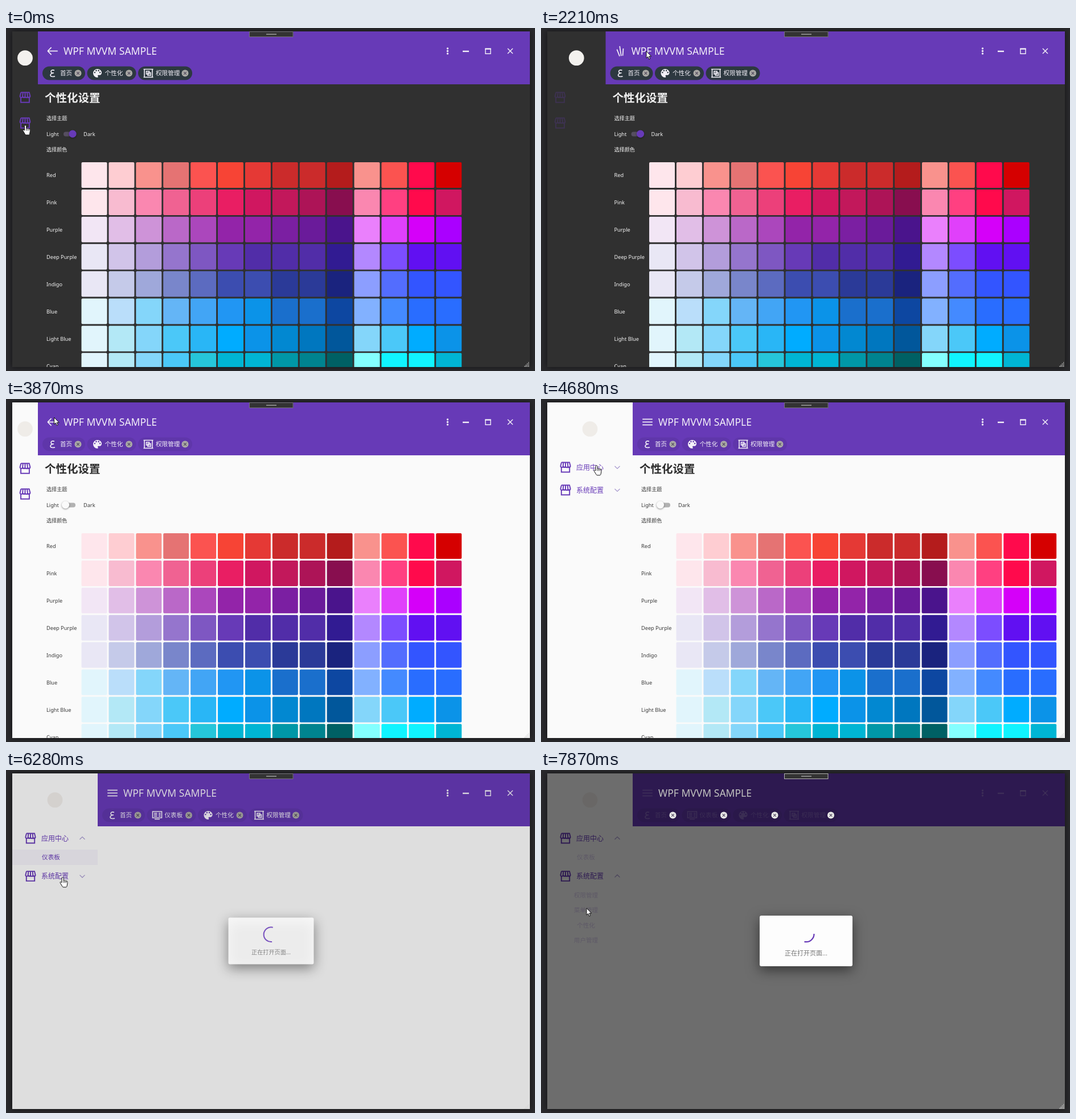
An HTML page with a canvas that plays this animation: 929x603 px, repeating every 8 s.

```html
<!DOCTYPE html>
<html lang="zh-CN">
<head>
<meta charset="utf-8">
<style>
html, body { margin: 0; height: 100%; overflow: hidden; background: #29292c }
canvas { display: block }
</style>
</head>
<body>
<canvas id="stage" width="929" height="603"></canvas>
<script>
const ctx = document.getElementById('stage').getContext('2d');
const LOOP = 8000, STEP = 120;
const PURPLE = '#673ab7';

// The screen refreshes every STEP ms, counted from each of these times.
const BURSTS = [0, 270, 1150, 1790, 1940, 2210, 3080, 3470, 3750, 4140, 4290, 4560,
  4960, 5340, 5610, 6130, 6280, 6650, 6800, 7560, 7720, 7870];

// Pointer track: time, x, y
const POINTER = [
  [0, 34, 171], [120, 199, 133], [270, 170, 165], [390, 140, 173], [510, 115, 130],
  [630, 95, 80], [750, 84, 48], [870, 80, 40], [1270, 81, 40], [1630, 172, 147],
  [1790, 179, 43], [1940, 185, 41], [2210, 185, 41], [2450, 142, 131], [2690, 107, 184],
  [3320, 107, 184], [3470, 99, 110], [3600, 94, 49], [3870, 84.5, 32.5], [4290, 84.5, 32.5],
  [4410, 97, 62], [4680, 97.5, 117], [5200, 97.5, 117], [5460, 88, 152], [6130, 88, 152],
  [6280, 99.5, 189], [6800, 99.5, 189], [7280, 80, 243], [8000, 80, 243]];

const PALETTE = {
  'Red': 'fee6ec fecdd2 f9928d e57373 fb5350 f74435 e53935 cb2b2b cb2b2b b41c1c f9928d fb5350 ff0a4c d50000',
  'Pink': 'fee6ec f8bbd0 fa87b0 f06292 ec407a e91e63 d01760 c2185b ad1457 880e4f fa87b0 ff4081 ff0a4c d01760',
  'Purple': 'f2e6f5 e1bee7 ce93d8 ba68c8 ab47bc 9324a9 9324a9 7b1fa2 6a1b9a 4a148c ea80fc e040fb d500f9 aa00ff',
  'Deep Purple': 'e9e7f5 d1c4e9 b39ddb 9575cd 7e57c2 673ab7 512da8 512da8 512da8 311b92 b388ff 7c4dff 6110f2 6110f2',
  'Indigo': 'e9e7f5 c5cae9 9fa8da 7986cb 5c6bc0 3c4db0 3c4db0 2b3a98 2b3a98 1a237e 8c9eff 536dfe 3355ff 3355ff',
  'Blue': 'e1f5fc badefa 84d6fa 64b5f6 42a5f5 2196f3 0b93e8 1a6fcc 1a6fcc 0d47a1 82b1ff 448aff 296dff 296dff',
  'Light Blue': 'e1f5fc b3e8f6 84d6fa 4bc8f8 29b6f6 00acff 0b93e8 0288d1 0077bf 01579b 84d6fa 4bc8f8 00acff 0b93e8',
  'Cyan': 'e1f5fc b3e8f6 84d6fa 4bc8f8 26c6da 00b5d4 00b5d4 0097a7 00838f 006064 84ffff 10f4ff 10f4ff 00b5d4'
};
const ROWS = Object.entries(PALETTE).map(([name, list]) => [name, list.split(' ')]);

const hole = (x, y) => `M${x} ${y - 1.5}a1.5 1.5 0 1 0 .01 0z`;
const ICON = {
  home: new Path2D('M3-5c-4-1.5-6 0-6 2.2s3 2.8 5 2.3c-4 .5-6 1.5-6 4s4 3 8 2'),
  board: new Path2D('M-8-6.5H8V4.5H-8ZM-4.5 7H4.5M-5.5-3.5H0M-5.5-1H0M-5.5 1.8H0M2.5-3.5H6M2.5-1H6M2.5 1.8H6'),
  group: new Path2D('M-7-7H7V7H-7ZM-3.5-3.5H1.5V1.5H-3.5ZM-1-1H4V4H-1ZM-8.5-7H-5.5M5.5-7H8.5M-8.5 7H-5.5M5.5 7H8.5'),
  palette: new Path2D('M12 3a9 9 0 0 0 0 18 1.5 1.5 0 0 0 1.5-1.5c0-.4-.15-.75-.4-1a1.5 1.5 0 0 1 1.1-2.5H16a5 5 0 0 0 5-5c0-4.4-4-8-9-8Z'
    + hole(6.5, 10.5) + hole(9.5, 6.5) + hole(14.5, 6.5) + hole(17.5, 10.5)),
  store: new Path2D('M-7-8.5H7L8.6-2.2C8.6 1-4.3 1-4.3-2 -4.3 1 0 1 0-2 0 1 4.3 1 4.3-2 4.3 1 8.6 1 8.6-2.2M-7-8.5-8.6-2.2C-8.6 1-4.3 1-4.3-2L-3.6-8M0-8V-2M3.6-8 4.3-2M-7.2.5V8.5H7.2V.5'),
  chevron: new Path2D('M-4.5-2 0 2.4 4.5-2'),
  arrow: new Path2D('M0 0V12l2.8-2.6L4.8 14l2-.9-2-4.3H8.7Z'),
  hand: new Path2D('M0 0c-1.5 0-1.5 1-1.5 1.5V9l-1.5-1c-1.5-.5-2 .7-1.2 1.6l3.7 6.2c.4.7.8 1.2 1.8 1.2h4.2c1.2 0 1.8-.7 2-1.8l.8-4.2c.3-1.8.2-4-.5-4.6-.6-.5-1.2-.3-1.5 0-.5-.9-1.8-1-2.3-.4-.4-.7-1.7-.8-2.3-.3V1.5C1.5.5 1 0 0 0Z')
};

const clamp = v => Math.min(1, Math.max(0, v));
const mix = (a, b, k) => a + (b - a) * k;
const ramp = (t, start, span) => clamp((t - start) / span);
const easeOut = k => 1 - (1 - k) ** 3;

function rect(x, y, w, h, color, r = 0) {
  ctx.fillStyle = color;
  ctx.beginPath();
  ctx.roundRect(x, y, w, h, r);
  ctx.fill();
}
function disc(x, y, r, color) {
  ctx.fillStyle = color;
  ctx.beginPath();
  ctx.arc(x, y, r, 0, 7);
  ctx.fill();
}
function line(color, width, ...pts) {
  ctx.strokeStyle = color;
  ctx.lineWidth = width;
  ctx.beginPath();
  for (let i = 0; i < pts.length; i += 2) ctx.lineTo(pts[i], pts[i + 1]);
  ctx.stroke();
}
function text(s, x, cy, size, color, weight = 400, align = 'left') {
  ctx.font = `${weight} ${size}px "Noto Sans", "Noto Sans CJK SC", "Noto Sans CJK", sans-serif`;
  ctx.textAlign = align;
  ctx.fillStyle = color;
  ctx.fillText(s, x, cy + size * .37);
}
function at(x, y, paint, { scale = 1, turn = 0, alpha = 1 } = {}) {
  ctx.save();
  ctx.translate(x, y);
  ctx.rotate(turn);
  ctx.scale(scale, scale);
  ctx.globalAlpha *= alpha;
  paint();
  ctx.restore();
}
function outline(path, color, width) {
  ctx.strokeStyle = color;
  ctx.lineWidth = width;
  ctx.stroke(path);
}

function snap(t) {
  const start = BURSTS.findLast(b => b <= t);
  return start + Math.floor((t - start) / STEP) * STEP;
}

function stateAt(t) {
  const slide = start => easeOut(ramp(t, start, 330));
  const open = slide(1050) - slide(2150) + slide(4102);
  const opened = t >= 4102 ? 4102 : t >= 2150 ? 2150 : t >= 1050 ? 1050 : -LOOP;
  return {
    t, open, edge: 56 + 105 * open,
    expanded: opened === 1050 || opened === 4102,
    menuIn: ramp(t, opened, 450),
    light: t >= 3080,
    thumb: ramp(t, 3020, 200),
    apps: ramp(t, 4900, 300),
    system: ramp(t, 6550, 300),
    board: t >= 5850,
    busy: t >= 5610 && t < 6130 || t >= 7560,
    enter: t < 7000 ? ramp(t, 5620, 300) : ramp(t, 7570, 300),
    leave: t < 7000 ? ramp(t, 6040, 300) : 0,
    since: t < 7000 ? t - 5560 : t - 7500
  };
}

function chipList(s) {
  const chips = [['home', '首页', 75], ['palette', '个性化', 86], ['group', '权限管理', 95]];
  if (s.board) chips.splice(1, 0, ['board', '仪表板', 86]);
  let x = s.edge + 8;
  return chips.map(([icon, label, w]) => {
    const chip = { icon, label, w, x };
    x += w + 3.5;
    return chip;
  });
}
function closeBadge(x, fill) {
  disc(x, 79.5, 6, fill);
  line('#50485c', 1.2, x - 2.3, 77.2, x + 2.3, 81.8);
  line('#50485c', 1.2, x + 2.3, 77.2, x - 2.3, 81.8);
}
const appTitle = (s, color) => text('WPF MVVM SAMPLE', s.edge + 45, 40.5, 17.5, color);

function drawHeader(s) {
  const ink = '#f3f0f8', dim = s.busy ? .26 : 1;
  rect(s.edge, 6, 920 - s.edge, 93, PURPLE);
  appTitle(s, ink);

  // Menu bars fold into a back arrow as the drawer closes.
  const fold = 1 - s.open;
  at(s.edge + 26, 40.5, () => {
    line(ink, 1.7, -8.8, 0, 8.8, 0);
    for (const side of [-1, 1])
      line(ink, 1.7, mix(-8.8, 2.4, fold), side * mix(5, 6.4, fold), 8.8, side * mix(5, 0, fold));
  }, { turn: Math.PI * fold, alpha: dim });

  for (const c of chipList(s)) {
    rect(c.x, 67.5, c.w, 24, s.light ? '#5f36aa' : '#2d3840', 12);
    at(c.x + 18, 79.5, () => {
      if (c.icon === 'palette') {
        ctx.scale(.84, .84);
        ctx.translate(-12, -12);
        ctx.fillStyle = ink;
        ctx.fill(ICON.palette, 'evenodd');
      } else outline(ICON[c.icon], ink, 1.6);
    }, { alpha: dim });
    at(0, 0, () => text(c.label, c.x + 31, 79.5, 10.6, ink), { alpha: dim });
    closeBadge(c.x + c.w - 12.5, '#aaa9a6');
  }

  at(0, 0, () => {
    for (const y of [36, 40.5, 45]) disc(775.5, y, 1.7, ink);
    line(ink, 2.4, 802, 41, 813, 41);
    ctx.strokeRect(0, 0, 0, 0);
    line(ink, 1.4, 842, 45.3, 842, 36.5, 851, 36.5, 851, 45.3, 841.3, 45.3);
    line(ink, 2.2, 841.3, 36.7, 851.7, 36.7);
    line(ink, 1.4, 881, 36, 890, 45);
    line(ink, 1.4, 890, 36, 881, 45);
  }, { alpha: dim });
}

function drawSettings(s) {
  const x = s.edge, ink = s.light ? '#3a3a3a' : '#f4f4f4';
  text('个性化设置', x + 12, 123, 19.5, s.light ? '#2c2c2c' : '#f0f0f0', 700);
  text('选择主题', x + 15, 159, 9.1, ink);
  text('选择颜色', x + 15, 213.5, 9.1, ink);
  text('Light', x + 15, 187, 9.2, ink);
  text('Dark', x + 80, 187, 9.2, ink);

  rect(x + 45, 182.5, 21, 8, s.light ? '#b2b2b2' : '#564e60', 4);
  ctx.save();
  ctx.shadowColor = 'rgba(0,0,0,.45)';
  ctx.shadowBlur = 3;
  ctx.shadowOffsetY = 1;
  disc(x + mix(61, 48.5, s.thumb), 186.2, 6.6, s.light ? '#fafafa' : PURPLE);
  ctx.restore();

  ROWS.forEach(([name, colors], row) => {
    text(name, x + 15, 259 + row * 47.9, 9.2, ink);
    colors.forEach((c, col) =>
      rect(x + 76.5 + col * 47.9, 236 + row * 47.9, 45, 45, '#' + c, 2));
  });
}

function menuHead(s, label, y, grow, scale) {
  const mid = 11 + (s.edge - 11) / 2;
  at(mid, y, () => {
    at(-43, 0, () => outline(ICON.store, PURPLE, 1.9));
    text(label, -24, .3, 12, PURPLE);
    at(48, 0, () => outline(ICON.chevron, s.light ? '#a99bcf' : '#5c5270', 1.3), { turn: Math.PI * grow });
  }, { scale, alpha: s.menuIn });
}
function subMenu(s, labels, top, height, grow, first) {
  if (!grow) return;
  ctx.save();
  ctx.beginPath();
  ctx.rect(11, top, 150, height * grow);
  ctx.clip();
  ctx.globalAlpha = s.busy ? .26 : grow;
  labels.forEach((label, i) => text(label, 79, first + i * 26.4, 10.6, PURPLE, 400, 'center'));
  ctx.restore();
}
function drawSidebar(s) {
  const hover = 'rgba(103,58,183,.05)';
  disc(11 + (s.edge - 11) / 2, 52.7, 13.4, s.light ? '#efece8' : '#f3f1ee');
  if (!s.expanded) {
    for (const y of [122, 167])
      at(33.5, y, () => outline(ICON.store, PURPLE, 1.9), { scale: 1.03, alpha: clamp(s.menuIn * 1.8) });
    return;
  }
  const scale = mix(.75, 1, s.menuIn);
  if (s.t >= 5340 && !(s.t >= 7560)) rect(11, 140, 150, 27, hover);
  if (s.t >= 7160 && s.t < 7560) rect(11, 233, 150, 26, hover);
  const second = 160 + 26.6 * s.apps;
  menuHead(s, '应用中心', 120, s.apps, scale);
  subMenu(s, ['仪表板'], 140, 27, s.apps, 153.5);
  menuHead(s, '系统配置', second, s.system, scale);
  subMenu(s, ['权限管理', '菜单管理', '个性化', '用户管理'], 203, 110, s.system, 220);
}

function drawDialog(s, shown) {
  if (!shown) return;
  const scale = s.leave ? 1 - .1 * s.leave : Math.sin(s.enter * Math.PI / 2);
  at(465.5, 300.5, () => {
    ctx.save();
    ctx.shadowColor = 'rgba(0,0,0,.5)';
    ctx.shadowBlur = 22;
    ctx.shadowOffsetY = 7;
    rect(-81.5, -44.5, 163, 89, '#fdfdfd', 3);
    ctx.restore();
    const angle = speed => (-90 + speed * s.since) * Math.PI / 180;
    ctx.strokeStyle = PURPLE;
    ctx.lineWidth = 2.2;
    ctx.beginPath();
    ctx.arc(0, -12.3, 14, angle(.24), angle(.52));
    ctx.stroke();
    text('正在打开页面...', 0, 21, 11, '#757575', 400, 'center');
  }, { scale, alpha: 1 - s.leave ** 9 });
}

function drawPointer(t) {
  const i = POINTER.findLastIndex(p => p[0] <= t);
  const [t0, x0, y0] = POINTER[i], [t1, x1, y1] = POINTER[i + 1];
  const k = (t - t0) / (t1 - t0);
  const shape = t < 120 || t >= 4600 && t < 7560 ? ICON.hand : ICON.arrow;
  at(mix(x0, x1, k), mix(y0, y1, k), () => {
    ctx.fillStyle = '#fff';
    ctx.fill(shape);
    outline(shape, '#111', 1);
    if (shape === ICON.hand) for (const x of [1.5, 3.8, 6.2]) line('#111', .8, x, 6, x, 9.5);
  });
}

function draw(time) {
  const t = snap(time), s = stateAt(t), shade = s.enter * (1 - s.leave);
  rect(0, 0, 929, 603, '#29292c');
  ctx.save();
  ctx.shadowColor = 'rgba(0,0,0,.5)';
  ctx.shadowBlur = 9;
  rect(11, 6, 909, 590, s.light ? '#fafafa' : '#303030');
  ctx.restore();

  ctx.save();
  ctx.beginPath();
  ctx.rect(11, 6, 909, 590);
  ctx.clip();
  if (!s.board) drawSettings(s);
  drawSidebar(s);
  drawHeader(s);
  rect(11, 6, 909, 590, `rgba(0,0,0,${.56 * shade})`);
  if (s.busy && shade) {
    at(0, 0, () => appTitle(s, '#fff'), { alpha: .55 * shade });
    at(0, 0, () => chipList(s).forEach(c => closeBadge(c.x + c.w - 12.5, '#e8e8e8')), { alpha: shade });
  }
  const grip = s.light && !(s.busy && shade) ? '#d2d2d2' : '#d8d8d8';
  for (let row = 0; row < 4; row++)
    for (let col = 0; col <= row; col++) rect(917 - col * 2.2, 587.5 + row * 2.2, 1.3, 1.3, grip);
  ctx.restore();

  rect(427, 6, 77.5, 10, '#333');
  ctx.lineWidth = 1;
  ctx.strokeStyle = s.busy && shade ? '#b4b4b4' : '#77747c';
  ctx.strokeRect(427.5, 6.5, 76.5, 9);
  rect(457, 10, 18, 2, '#858585');

  drawDialog(s, shade);
  drawPointer(t);
}

function loop(now) {
  draw(now % LOOP);
  requestAnimationFrame(loop);
}
requestAnimationFrame(loop);
</script>
</body>
</html>
```
